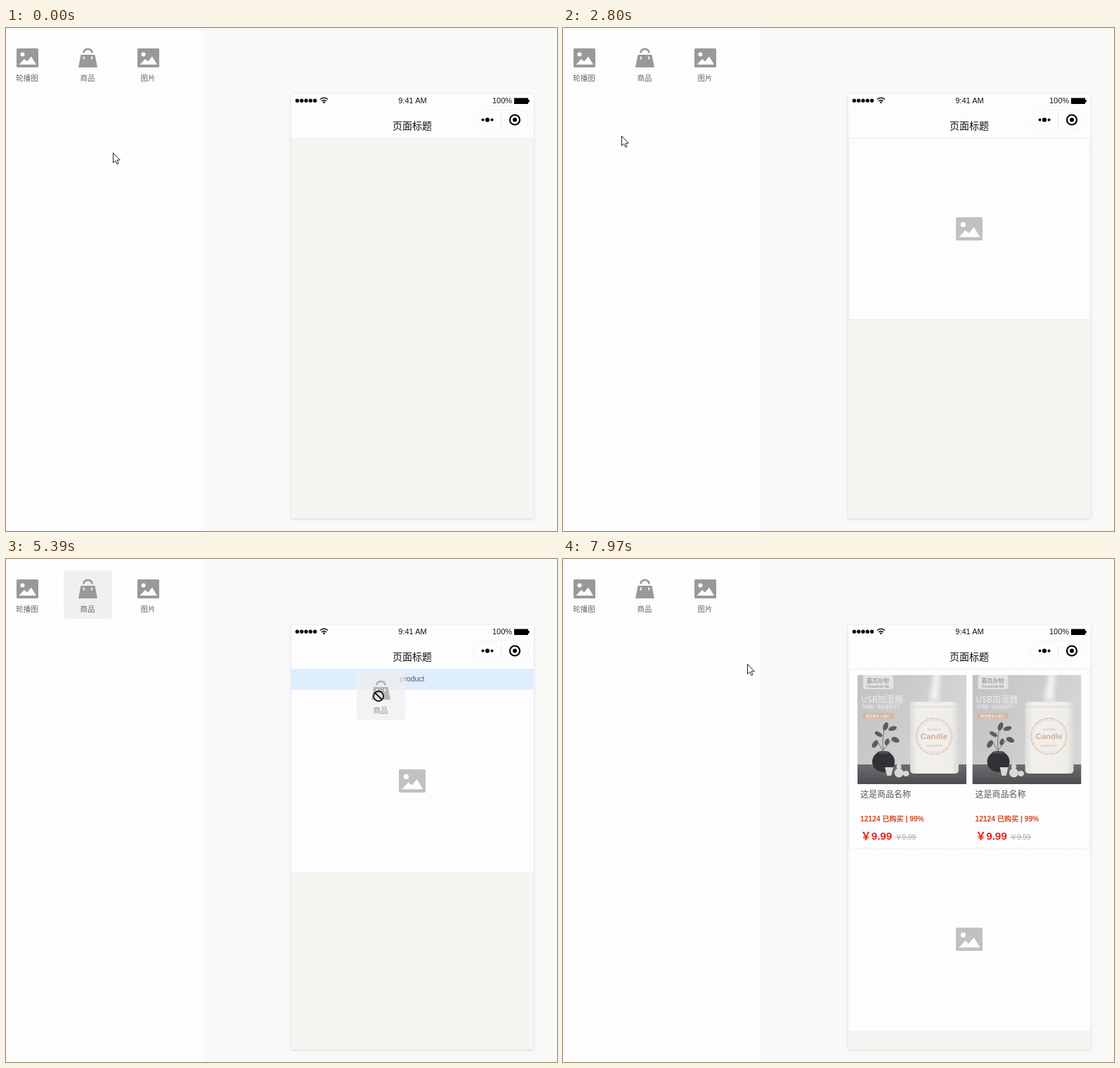
An HTML page for the animation above (8 s loop, 784x715 px).

```html
<!DOCTYPE html>
<html lang="zh">
<head>
<meta charset="utf-8">
<title>页面编辑</title>
<style>
html, body { margin: 0; width: 100%; height: 100%; overflow: hidden; background: #f9faf8; }
svg { display: block; width: 784px; height: 715px; }
text { font-family: "Liberation Sans", "Noto Sans CJK SC", "Noto Sans CJK", sans-serif; }
.cn { font-family: "Noto Sans CJK SC", "Noto Sans CJK", sans-serif; }
.mid { text-anchor: middle; }
.label { font-size: 10.5px; fill: #666; }
.dash { fill: none; stroke: #e2e2f0; stroke-dasharray: 2 1; }
</style>
</head>
<body>
<svg viewBox="0 0 784 715">
  <defs>
    <filter id="shade" x="-10%" y="-10%" width="120%" height="120%">
      <feDropShadow dx="0" dy="1" stdDeviation="2" flood-color="#77779a" flood-opacity=".3"/>
    </filter>
    <filter id="soft" x="-100%" y="-50%" width="300%" height="200%"><feGaussianBlur stdDeviation="3"/></filter>
    <linearGradient id="wall" x1="0" y1="0" x2="1" y2=".4">
      <stop offset="0" stop-color="#c2c2c3"/><stop offset="1" stop-color="#d6d6d5"/>
    </linearGradient>
    <linearGradient id="table" x1="0" y1="0" x2="0" y2="1">
      <stop offset="0" stop-color="#6d6d70"/><stop offset="1" stop-color="#4c4c50"/>
    </linearGradient>
    <linearGradient id="jar">
      <stop offset="0" stop-color="#dedddb"/><stop offset=".15" stop-color="#f0efec"/>
      <stop offset=".85" stop-color="#efeeeb"/><stop offset="1" stop-color="#d9d8d6"/>
    </linearGradient>
    <clipPath id="crop"><rect width="155" height="155"/></clipPath>

    <g id="picture">
      <rect width="31" height="27" rx="1.5"/>
      <circle cx="8.5" cy="8.5" r="3" fill="#fdfdff"/>
      <path d="M3.5 23 11 15 15 18.5 21 11.5 28 23Z" fill="#fdfdff"/>
    </g>
    <g id="bag">
      <path d="M3.5 9H23.5L27 27H0Z"/>
      <path d="M7.3 6.5C8.5-1 18.5-1 19.7 6.5" fill="none" stroke="#999" stroke-width="2.6"/>
      <path d="M7.8 11.5v4M19.2 11.5v4" stroke="#fdfdff" stroke-width="1.8"/>
    </g>
    <g id="tile0"><use href="#picture" x="19" y="13" fill="#999"/><text class="cn mid label" x="34" y="58.7">轮播图</text></g>
    <g id="tile1"><use href="#bag" x="21" y="13" fill="#999"/><text class="cn mid label" x="34" y="58.7">商品</text></g>
    <g id="tile2"><use href="#picture" x="19" y="13" fill="#999"/><text class="cn mid label" x="34" y="58.7">图片</text></g>

    <g id="photo" clip-path="url(#crop)">
      <rect width="155" height="155" fill="url(#wall)"/>
      <rect y="127" width="155" height="28" fill="url(#table)"/>
      <path d="M105 38C99 22 112 14 107-4H116C120 14 113 22 116 38Z" fill="#fff" opacity=".75" filter="url(#soft)"/>
      <rect x="8" y="0" width="43" height="20" rx="3" fill="#e3e3e3"/>
      <text class="cn mid" x="29" y="11" font-size="8" fill="#888">暮岚杂物</text>
      <text class="mid" x="29" y="18" font-size="5" fill="#888">Household life</text>
      <text class="cn" x="5" y="39" font-size="12" font-weight="300" fill="#eee">USB加湿器</text>
      <text class="cn" x="6" y="47" font-size="5.5" fill="#f4f4f4">净润每一刻的清新空气</text>
      <rect x="7" y="54" width="44" height="8" fill="#d6b3a2"/>
      <text class="cn mid" x="29" y="60" font-size="5" fill="#fff">静音雾化小夜灯</text>
      <path d="M75 42Q75 38 80 38H139Q144 38 144 42V135Q144 140 138 140H81Q75 140 75 135Z" fill="url(#jar)"/>
      <path d="M76 45H143" stroke="#d2d1cf"/>
      <rect x="103" y="32" width="13" height="7" rx="2" fill="#e4e4e3"/>
      <g fill="none" stroke="#dcc0aa">
        <circle cx="109" cy="87" r="25.5" stroke-width="1.3" stroke-dasharray="7 1"/>
        <circle cx="109" cy="87" r="23" stroke-width=".5"/>
      </g>
      <g fill="#d2b094">
        <text class="mid" x="109" y="91" font-size="11.5" font-weight="700">Candle</text>
        <text class="mid" x="109" y="79" font-size="4">SCENTED</text>
        <text class="mid" x="109" y="102" font-size="4">HUMIDIFIER</text>
      </g>
      <path d="M37 110Q34 90 40 70M37 106Q46 94 54 88M36 108Q30 96 26 92" fill="none" stroke="#6b736a" stroke-width="1"/>
      <g fill="#566054">
        <ellipse cx="40" cy="73" rx="3.5" ry="6" transform="rotate(20 40 73)"/>
        <ellipse cx="50" cy="76" rx="6" ry="3" transform="rotate(-15 50 76)"/>
        <ellipse cx="30" cy="84" rx="6" ry="3" transform="rotate(30 30 84)"/>
        <ellipse cx="54" cy="92" rx="6" ry="3.5" transform="rotate(25 54 92)"/>
        <ellipse cx="25" cy="98" rx="3.5" ry="6" transform="rotate(35 25 98)"/>
        <ellipse cx="42" cy="95" rx="3" ry="5" transform="rotate(20 42 95)"/>
      </g>
      <ellipse cx="37" cy="123" rx="16" ry="15" fill="#303238"/>
      <ellipse cx="37" cy="110" rx="9" ry="2" fill="#4b4d54"/>
      <g fill="#dad8d4">
        <path d="M39 131H51L48 143H42Z"/>
        <circle cx="59" cy="139" r="6.5"/><circle cx="59" cy="130" r="3.5"/><rect x="58" y="121" width="2" height="7"/>
        <ellipse cx="69" cy="140" rx="4.5" ry="4"/>
      </g>
    </g>

    <g id="item">
      <use href="#photo"/>
      <text class="cn" x="4" y="174.3" font-size="12" fill="#555">这是商品名称</text>
      <text x="4" y="207.6" font-size="10.2" font-weight="700" fill="#cf4a20">12124 已购买 | 99%</text>
      <text x="4.5" y="234.3" font-size="15.2" font-weight="700" fill="#e42420">￥9.99</text>
      <text x="53.5" y="233.8" font-size="10" fill="#aaa">￥9.99</text>
      <path d="M53.5 230.5H83.5" stroke="#aaa"/>
    </g>
  </defs>

  <rect width="784" height="715" fill="#f9faf8"/>
  <rect y="3" width="281" height="712" fill="#fdfdff"/>
  <rect id="hover" y="16" width="69" height="69" rx="5" fill="#f0f0f0"/>
  <use href="#tile0" x="-4" y="16"/>
  <use href="#tile1" x="82" y="16"/>
  <use href="#tile2" x="168" y="16"/>

  <rect x="406" y="94" width="344.5" height="603" fill="#f5f5f2" filter="url(#shade)"/>
  <rect x="406" y="94" width="344.5" height="62" fill="#fdfdff"/>
  <g id="signal" fill="#111"></g>
  <path d="M447 101.5Q452.5 97 458 101.5M449.2 104Q452.5 101.2 455.8 104" fill="none" stroke="#111" stroke-width="1.5"/>
  <path d="M450.6 105.3Q452.5 103.9 454.4 105.3L452.5 107.5Z" fill="#111"/>
  <text class="mid" x="578.5" y="107" font-size="11" fill="#111">9:41 AM</text>
  <text x="692" y="107" font-size="11" fill="#111">100%</text>
  <path d="M723 99.5H743V102H744.7V105.5H743V108H723Z"/>
  <text class="cn mid" x="578" y="144.2" font-size="14" fill="#111">页面标题</text>
  <rect x="664.5" y="116.5" width="79" height="28" rx="14" fill="#fdfdff" stroke="#f5f5f6"/>
  <path d="M704.5 122V139" stroke="#e4e4ea"/>
  <circle cx="678.5" cy="130.5" r="2"/><circle cx="685" cy="130.5" r="3.1"/><circle cx="691.5" cy="130.5" r="2"/>
  <circle cx="724" cy="130.5" r="7" fill="none" stroke="#000" stroke-width="2.2"/><circle cx="724" cy="130.5" r="3"/>

  <g id="image">
    <rect x="406" width="344.5" height="259" fill="#fdfdff"/>
    <use href="#picture" fill="#c1c1c1" transform="translate(559 113) scale(1.225)"/>
    <rect id="imageDash" class="dash" x="407" y=".5" width="342.5" height="258"/>
  </g>
  <g id="product">
    <rect x="406" y="156" width="344.5" height="255" fill="#fdfdff"/>
    <use href="#item" x="419" y="165"/><use href="#item" x="582.5" y="165"/>
    <rect class="dash" x="407" y="156.5" width="342.5" height="254.5"/>
  </g>
  <g id="bar">
    <rect x="406" width="344.5" height="29.5" fill="#dfeeff"/>
    <text id="barText" class="mid" x="578" y="18" font-size="10.4" fill="#555"></text>
  </g>

  <g id="ghost" opacity=".7">
    <rect width="69" height="69" rx="5" fill="#efefef"/>
    <use id="ghostTile"/>
  </g>
  <g id="pointer">
    <g id="arrow">
      <rect id="copy" x="3" y="12.5" width="10" height="8" fill="#ccc" stroke="#333" stroke-dasharray="1 1"/>
      <path d="M.5.5V14.5L3.8 11.5 6 16.5 8 15.5 6 10.8H10.3Z" fill="#fff" stroke="#222"/>
    </g>
    <g id="deny" fill="none" stroke="#111" stroke-width="1.8"><circle r="7" fill="#fff" fill-opacity=".6"/><path d="M-5-5 5 5"/></g>
  </g>
</svg>
<script>
const LOOP = 8000;
const $ = id => document.getElementById(id);

// time, x, y of the pointer
const path = [
  [0, 152, 177], [130, 152, 177], [850, 191, 54], [970, 191, 54],
  [1560, 468, 340], [1720, 475, 336], [2160, 475, 336],
  [2780, 83, 153], [2970, 84, 152], [3400, 113, 51], [3500, 113, 51],
  [3640, 80, 190], [3780, 128, 270], [3940, 452, 232], [4200, 452, 232],
  [4410, 468, 203], [4680, 500, 305], [5000, 496, 150], [5090, 500, 140], [5260, 500, 140],
  [5390, 530, 195], [5640, 560, 308], [6000, 566, 210], [6110, 568, 206],
  [6700, 575, 290], [6780, 576, 294], [6910, 572, 222], [6960, 570, 220],
  [7720, 400, 200], [7970, 262, 149], [8000, 262, 149]
];
const drags = [
  { from: 980, to: 2160, tile: 2, name: "images", grab: [191, 54] },
  { from: 3500, to: 6950, tile: 1, name: "product", grab: [113, 51] }
];
// time from which the drop bar is hidden, above or below
const bars = [
  [0, ""], [1420, "top"], [2160, ""], [3900, "top"], [4620, "end"], [4760, "top"],
  [5560, "end"], [5780, "top"], [6660, "end"], [6860, "top"], [6950, ""]
];

const show = (id, on) => { $(id).style.display = on ? "" : "none"; };
const move = (id, x, y) => $(id).setAttribute("transform", `translate(${x} ${y})`);
const tileX = i => i * 86 - 4;

function pointAt(t) {
  let i = 0;
  while (i < path.length - 2 && t >= path[i + 1][0]) i++;
  const [a, b] = [path[i], path[i + 1]];
  const k = Math.min(1, (t - a[0]) / (b[0] - a[0]));
  const e = k * k * (3 - 2 * k);
  return [1, 2].map(n => Math.round(a[n] + (b[n] - a[n]) * e));
}

function draw(t) {
  const [x, y] = pointAt(t);
  const drag = drags.find(d => t >= d.from && t < d.to);
  const bar = bars.filter(b => t >= b[0]).pop()[1];
  const hasImage = t >= 2160, hasProduct = t >= 6950;

  const over = y > 16 && y < 85 ? [0, 1, 2].find(i => x >= tileX(i) && x < tileX(i) + 69) : undefined;
  const lit = drag ? drag.tile : over;
  show("hover", lit !== undefined);
  if (lit !== undefined) $("hover").setAttribute("x", tileX(lit));

  show("image", hasImage);
  show("imageDash", t < 3900);
  move("image", 0, hasProduct ? 411 : bar === "top" ? 186 : 156);
  show("product", hasProduct);

  show("bar", bar);
  move("bar", 0, bar === "end" ? 415 : 156);
  if (drag) $("barText").textContent = drag.name;

  show("ghost", drag);
  if (drag) {
    $("ghostTile").setAttribute("href", "#tile" + drag.tile);
    move("ghost", x - drag.grab[0] + tileX(drag.tile), y - drag.grab[1] + 16);
  }

  const denied = drag && (x < 406 || y < 156 || (t > 5000 && t < 5430));
  show("deny", denied);
  show("arrow", !denied);
  show("copy", drag);
  move("pointer", x, y);
}

$("signal").innerHTML = [0, 1, 2, 3, 4]
  .map(i => `<circle cx="${414.4 + i * 6.3}" cy="103.3" r="2.7"/>`).join("");

function tick() {
  draw(performance.now() % LOOP);
  requestAnimationFrame(tick);
}
tick();
</script>
</body>
</html>
```
